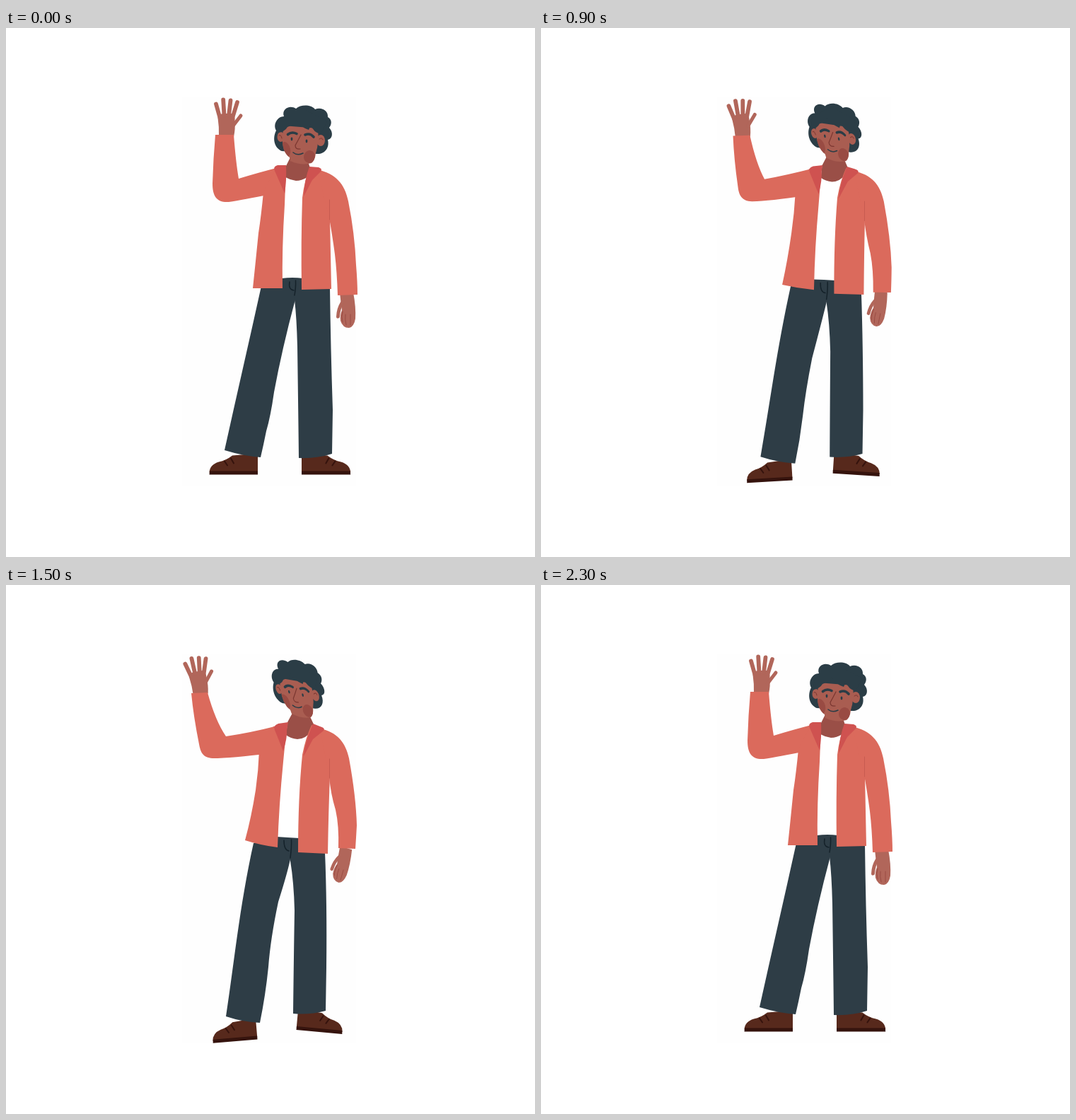
An HTML page with a canvas for the animation above (2.4 s loop, 748x748 px).

```html
<!DOCTYPE html>
<html lang="en">
<head>
<meta charset="utf-8">
<title>Waving man</title>
<style>
html, body { margin: 0; width: 100%; height: 100%; overflow: hidden; background: #fff; }
canvas { display: block; width: 748px; height: 748px; }
</style>
</head>
<body>
<canvas id="stage" width="748" height="748"></canvas>
<script>
const ctx = document.getElementById('stage').getContext('2d');

const C = {
  coat: '#db6a5c', collar: '#cf5250', seam: '#c75b50', hair: '#2b3d46', pants: '#2e3d46',
  skin: '#a95d51', hand: '#b1665a', neck: '#9a4f47', cheek: '#994b43', line: '#7a3630',
  ink: '#15222a', shoe: '#57291c', sole: '#35130d'
};

// One swing has six poses, played forwards and then backwards.
const STEP = 100;
const SWING = {
  arm:   [0, .25, .72, 1, .92, .62],
  legs:  [0, .25, .72, 1, .87, .58],
  body:  [0, .25, .72, 1, 1.03, .84],
  drift: [0, 0, 0, 0, -1.7, -1.7]
};

// Each shape: [resting outline, swung outline]
const SHAPES = {
  sleeve: [
    'M296 151 L322 151 Q325 190 329 213 Q355 205 386 197 L374 235 Q335 243 315 246 C298 247 292 238 292 220 Q293 185 296 151 Z',
    'M262 153 L285 152 Q296 192 311 214 Q345 209 380 200 L372 238 Q320 245 292 245 C278 244 275 236 273 225 Q265 185 262 153 Z'],
  leftPanel: [
    'M382 197 L396 196 L394 250 Q390 310 391 368 Q370 368 349 368 Q353 330 357 290 Q361 264 364 232 Z',
    'M378 200 L397 198 L392 250 Q386 310 384 371 Q360 368 338 361 Q347 328 353 290 Q357 262 358 234 Z'],
  rightPanel: [
    'M430 197 L446 203 Q462 220 458 270 Q459 320 460 369 L418 370 Q417 300 419 240 Q422 215 430 197 Z',
    'M432 198 L450 205 Q462 220 458 270 Q456 320 455 380 L413 378 Q413 300 419 240 Q424 215 432 198 Z'],
  rightSleeve: [
    'M440 200 C466 206 479 220 484 245 Q493 290 495 335 Q497 360 497 377 L469 378 Q468 345 465 320 Q461 290 457 269 Z',
    'M444 203 C468 208 480 222 485 245 Q495 300 496 340 Q495 358 494 373 L470 372 Q471 340 466 318 Q459 295 457 271 Z'],
  seam: ['M457.5 243 L457.5 271', 'M457.5 246 L457.5 273'],
  shirt: [
    'M395 205 L428 205 L424 260 L420 354 Q405 352 390 354 L394 250 Z',
    'M396 205 L430 208 L418 260 L415 358 Q398 357 383 356 L390 250 Z'],
  neck: [
    'M402 183 L426 185 L430 198 L426 211 Q418 216 410 216 Q402 215 395 211 L396 195 Z',
    'M405 181 L429 184 L436 199 L433 205 Q424 218 412 218 Q402 217 396 212 L398 194 Z'],
  leftCollar: [
    'M396 194 L384 194 Q377 196 380 202 L394 234 Q397 215 396 194 Z',
    'M399 194 L385 196 Q377 199 380 205 L392 235 Q398 215 397 206 Z'],
  rightCollar: [
    'M429 196 L442 197 Q448 199 445 203 L433 215 L421 238 Q422 214 429 196 Z',
    'M434 196 L444 200 Q452 202 449 206 L434 218 L421 242 Q422 225 434 196 Z'],
  leftLeg: [
    'M361 365 L390 352 L414 352 L409 384 Q390 455 379 515 Q374 550 368 570 Q364 590 360 607 Q335 605 309 597 C326 520 344 442 361 365 Z',
    'M350 365 L384 354 L410 354 L401 392 Q397 410 385 448 Q374 500 371 540 Q367 580 359 619 Q335 618 311 610 C322 540 330 455 350 365 Z'],
  rightLeg: [
    'M400 352 L420 352 L458 368 Q459 450 462 540 L461 602 Q440 609 414 608 Q413 520 412 450 Q411 410 408 384 Z',
    'M394 355 L415 356 L451 378 Q454 450 453 540 L452 602 Q430 608 406 606 Q407 520 408 460 Q407 420 402 390 Z'],
  fly: [
    'M409.5 357 Q410 366 408 378 M401 359 Q399 370 407 371',
    'M403.5 360 Q404 370 402 386 M393 361 Q393 375 400 376']
};

const mix = (a, b, w) => a + (b - a) * w;

function morph([rest, swung], w) {
  const ends = swung.match(/-?[\d.]+/g);
  let i = 0;
  return rest.replace(/-?[\d.]+/g, n => mix(+n, +ends[i++], w).toFixed(2));
}

function fill(d, color) {
  ctx.fillStyle = color;
  ctx.fill(new Path2D(d));
}

function stroke(d, color, width) {
  ctx.strokeStyle = color;
  ctx.lineWidth = width;
  ctx.stroke(new Path2D(d));
}

function oval(x, y, rx, ry, color, tilt = 0) {
  ctx.fillStyle = color;
  ctx.beginPath();
  ctx.ellipse(x, y, rx, ry, tilt, 0, Math.PI * 2);
  ctx.fill();
}

function at(x, y, degrees, sx, draw) {
  ctx.save();
  ctx.translate(x, y);
  ctx.rotate(degrees * Math.PI / 180);
  ctx.scale(sx, 1);
  draw();
  ctx.restore();
}

// Heel at the origin, toe to the left
function shoe() {
  fill('M0 -30 L-36 -27 Q-45 -20 -55 -18 Q-68 -14 -68.5 -3 L0 -3 Z', C.shoe);
  fill('M0 -5 L-68 -5 L-68.5 0 L0 0 Z', C.sole);
  stroke('M-47 -19 L-43 -13 M-38 -23 L-34 -16', C.sole, 2);
}

// Wrist at the origin
function raisedHand() {
  fill('M-10.5 2 Q-10 -12 -12 -25 Q-10 -31 -4 -31 L8 -31 Q13 -29 12 -20 Q13 -10 10.5 2 Z', C.hand);
  stroke('M-14.5 -44.5 L-9 -25 M-4.3 -50.5 L-3 -28 M6 -49.5 L3.5 -28 M15.5 -47 L9 -26', C.hand, 5.8);
  stroke('M20.5 -28 L9 -13', C.hand, 5);
}

function loweredHand() {
  fill('M-9 -3 L10 -3 Q14 18 13 34 Q11 46 4 47 Q-5 47 -8 37 Q-9 29 -6 22 Q-8 8 -9 -3 Z', C.hand);
  stroke('M-6 12 Q-11 20 -11.5 31', C.hand, 5);
  stroke('M-5 24 Q-7 31 -5 39 M-1 28 Q-2 35 0 43 M6 28 Q6 36 6 43', C.cheek, 1);
}

function head() {
  fill('M390 174 C380 170 376 157 382 145 C377 136 384 125 393 125 C389 114 402 108 410 114 C417 108 431 108 437 115 C446 111 456 117 455 126 C461 129 461 136 457 141 C463 147 462 157 455 158 C458 170 450 179 439 178 Z', C.hair);
  oval(388.5, 154, 5, 7, C.skin);
  oval(445, 159, 6, 8, C.skin);

  const face = 'M392 138 L441 142 Q443 162 438 177 Q437 187 432 191 Q417 195 402 188 L401 183 Q390 175 391 155 Z';
  fill(face, C.skin);
  ctx.save();
  ctx.clip(new Path2D(face));
  oval(395, 172, 7, 11, C.cheek, -.2);
  oval(429, 182, 8, 9, C.cheek, .2);
  ctx.restore();

  fill('M384 148 Q394 147 398 140 Q408 137 411 130 Q416 140 428 144 Q430 141 430 136 Q435 148 445 150 L454 132 L420 114 L388 130 Z', C.hair);
  stroke('M386 152 Q389 150 390 156 M443 157 Q447 154 448 158', C.line, 1);
  stroke('M398.5 150.5 Q404 146 411 149.5 M423 151 Q430 148 435 154', C.hair, 3.6);
  oval(404, 157, 1.4, 2.4, C.hair);
  oval(425, 160, 1.4, 2.4, C.hair);
  stroke('M417 151 Q413 159 409 166 Q409 172 416 171', C.line, 1.2);
  stroke('M406 176 Q412 181 420 177', C.hair, 1.6);
}

function draw(pose) {
  const arm = SWING.arm[pose], legs = SWING.legs[pose], body = SWING.body[pose];
  const drift = SWING.drift[pose];
  const part = (name, w, color) => fill(morph(SHAPES[name], w), color);

  ctx.fillStyle = '#fff';
  ctx.fillRect(0, 0, 748, 748);
  ctx.fillStyle = '#fefefe';
  ctx.fillRect(249, 97, 246, 551);
  ctx.lineCap = ctx.lineJoin = 'round';

  at(mix(356, 355.5, legs), mix(631.5, 642.5, legs), -4.8 * legs, mix(1, .92, legs), shoe);
  at(mix(418, 410.5, legs), mix(631.5, 629, legs), 5.2 * legs, mix(-1.01, -.95, legs), shoe);
  part('leftLeg', legs, C.pants);
  part('rightLeg', legs, C.pants);

  at(mix(311.5, 275, arm), mix(152, 153, arm), -9.5 * arm, 1, raisedHand);
  part('sleeve', arm, C.coat);

  ctx.save();
  ctx.translate(drift, 0);
  at(mix(481, 479.5, arm), mix(377, 374.5, arm), 16 * arm, mix(1, .92, arm), loweredHand);
  part('shirt', body, '#fff');
  stroke(morph(SHAPES.fly, body), C.ink, 1.5);
  part('neck', body, C.neck);
  part('leftPanel', body, C.coat);
  part('rightPanel', body, C.coat);
  part('rightSleeve', body, C.coat);
  stroke(morph(SHAPES.seam, body), C.seam, 1);
  part('leftCollar', body, C.collar);
  part('rightCollar', body, C.collar);

  // The head leans and turns around its left ear.
  ctx.translate(mix(388, 385.5, body), mix(154, 147, body));
  ctx.transform(mix(1, .895, body), .075 * body, .17 * body, mix(1, .99, body), 0, 0);
  ctx.translate(-388, -154);
  head();
  ctx.restore();
}

const start = performance.now();
let shown = -1;

function tick() {
  const step = Math.floor(Math.max(0, performance.now() - start) / STEP) % 12;
  const pose = step < 6 ? step : 11 - step;
  if (pose !== shown) draw(shown = pose);
  requestAnimationFrame(tick);
}
tick();
</script>
</body>
</html>
```
